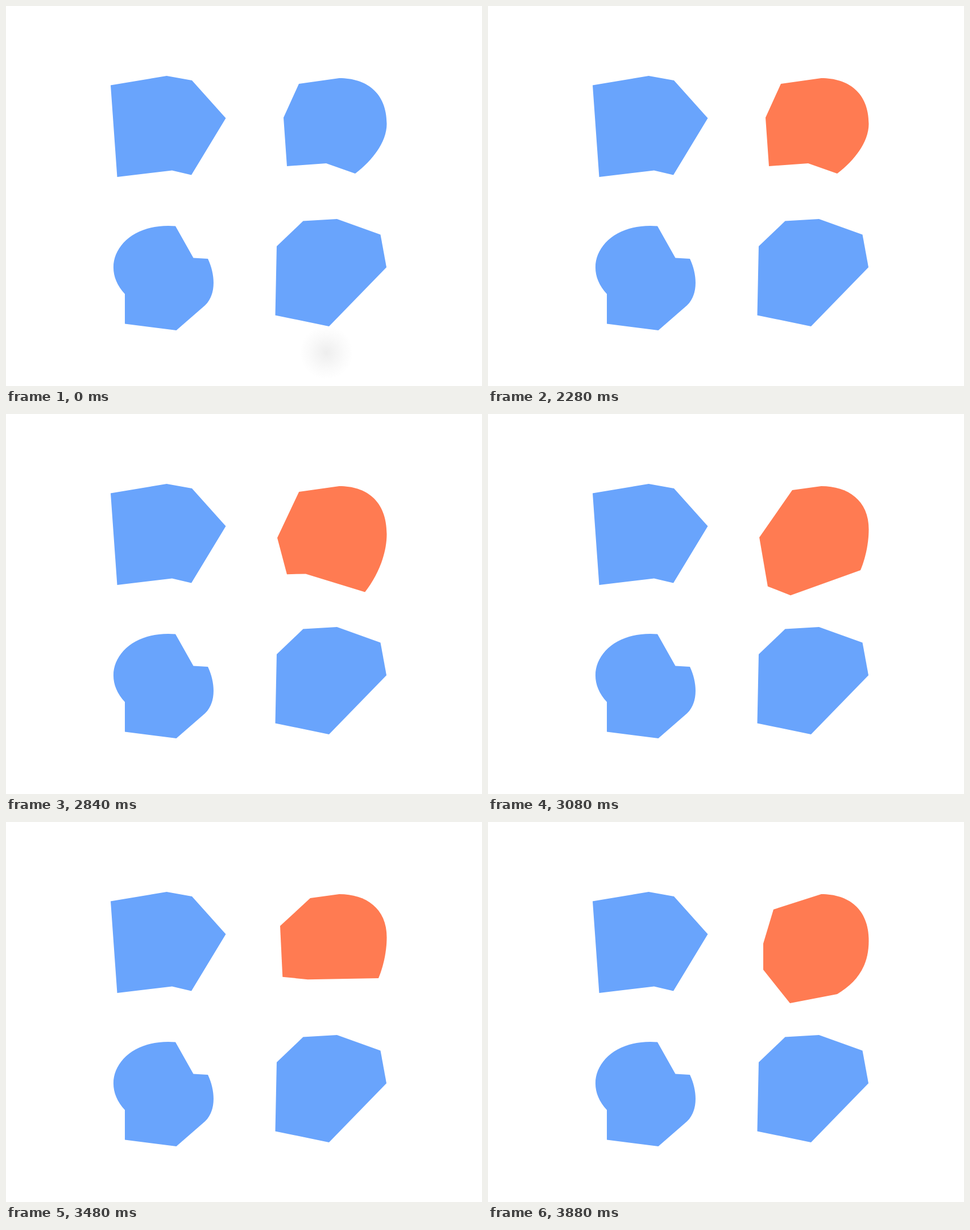
Write an HTML page that moves like this. It is 837 by 669 pixels and loops after 4 s.

```html
<!DOCTYPE html>
<html lang="en">
<head>
<meta charset="utf-8">
<title>Morphing shapes</title>
<style>
  html, body { margin: 0; width: 100%; height: 100%; overflow: hidden; background: #fff; }
  svg { display: block; width: 837px; height: 669px; fill: #69a4fc; }
</style>
</head>
<body>
<svg viewBox="0 0 837 669">
  <defs>
    <radialGradient id="glow">
      <stop offset="0" stop-color="#eee"/>
      <stop offset=".65" stop-color="#fafafa"/>
      <stop offset="1" stop-color="#fff"/>
    </radialGradient>
  </defs>
  <circle id="spot" cx="563.5" cy="610" r="47" fill="url(#glow)"/>
  <path d="M184 139.5L282.5 123L327 131L386.5 197.5L326 297.5L292 289.5L195.5 301Z"/>
  <path d="M298 387.5L329.5 443.5L355 445C369 475 369 509 350 527L299.5 571L209 559.5V507C160 455 205 380 298 387.5Z"/>
  <path d="M476 423L522.5 378.5L582 375L658.5 402.5L669 460L568 564L473.5 544.5Z"/>
  <path id="blob"/>
</svg>
<script>
  const LOOP = 4000, STEP = 40, RECOLOR = 2160, MORPH = 2440;
  const BLUE = [105, 164, 252], ORANGE = [255, 123, 82];
  const blob = document.getElementById('blob');
  const spot = document.getElementById('spot');

  const easeInOut = u => u * u * (3 - 2 * u);
  const easeIn = u => u ** 2.2;
  const easeOut = u => 1 - (1 - u) ** 1.6;

  const rest = {
    top: [515, 137], left: [488, 196.5], low: [494, 282],
    bottom: [563, 277], right: [614, 295], round: [0]
  };

  // Each stage names only the corners it moves
  const stages = [
    { end: 2830, ease: easeInOut, to: { left: [477, 218], bottom: [527, 281], right: [631, 314] } },
    { end: 3000, ease: easeInOut, to: { top: [535, 134], low: [492, 304], bottom: [532, 320], right: [655, 275] } },
    { end: 3560, ease: easeIn, to: { left: [484, 169], low: [484, 260], bottom: [530, 260] } },
    { end: 3880, ease: easeOut, to: { top: [502, 154], left: [484, 214], bottom: [531, 319], right: [614, 303], round: [1] } }
  ];

  const clamp = u => Math.min(1, Math.max(0, u));
  const mix = (a, b, u) => a.map((v, i) => v + (b[i] - v) * u);

  function poseAt(t) {
    const pose = { ...rest };
    let begin = MORPH;
    for (const { end, ease, to } of stages) {
      const u = ease(clamp((t - begin) / (end - begin)));
      for (const key in to) pose[key] = mix(pose[key], to[key], u);
      begin = end;
    }
    return pose;
  }

  // The arc runs from the fixed crown over its rightmost point to the right corner
  function outline({ top, left, low, bottom, right, round: [r] }) {
    const [ex, ey] = right;
    const x = 669.5, y = 203 + 0.22 * (ey - 275);
    const dx = x - ex, dy = ey - y;
    return `M586 127C633 127 ${x} 152 ${x} ${y}` +
      `C${x} ${y + (0.36 + 0.12 * r) * dy} ` +
      `${ex + (0.56 + 0.06 * r) * dx} ${ey - (0.27 - 0.05 * r) * dy} ${right}` +
      `L${bottom}L${low}L${left}L${top}Z`;
  }

  function draw(now) {
    const t = Math.floor((now % LOOP) / STEP) * STEP;
    const tint = clamp((t - RECOLOR) / (3 * STEP));
    blob.setAttribute('d', outline(poseAt(t)));
    blob.setAttribute('fill', `rgb(${mix(BLUE, ORANGE, tint).map(Math.round)})`);
    spot.style.visibility = tint > 0 ? 'hidden' : 'visible';
  }

  const start = performance.now();
  function tick() {
    draw(performance.now() - start);
    requestAnimationFrame(tick);
  }
  tick();
</script>
</body>
</html>
```
